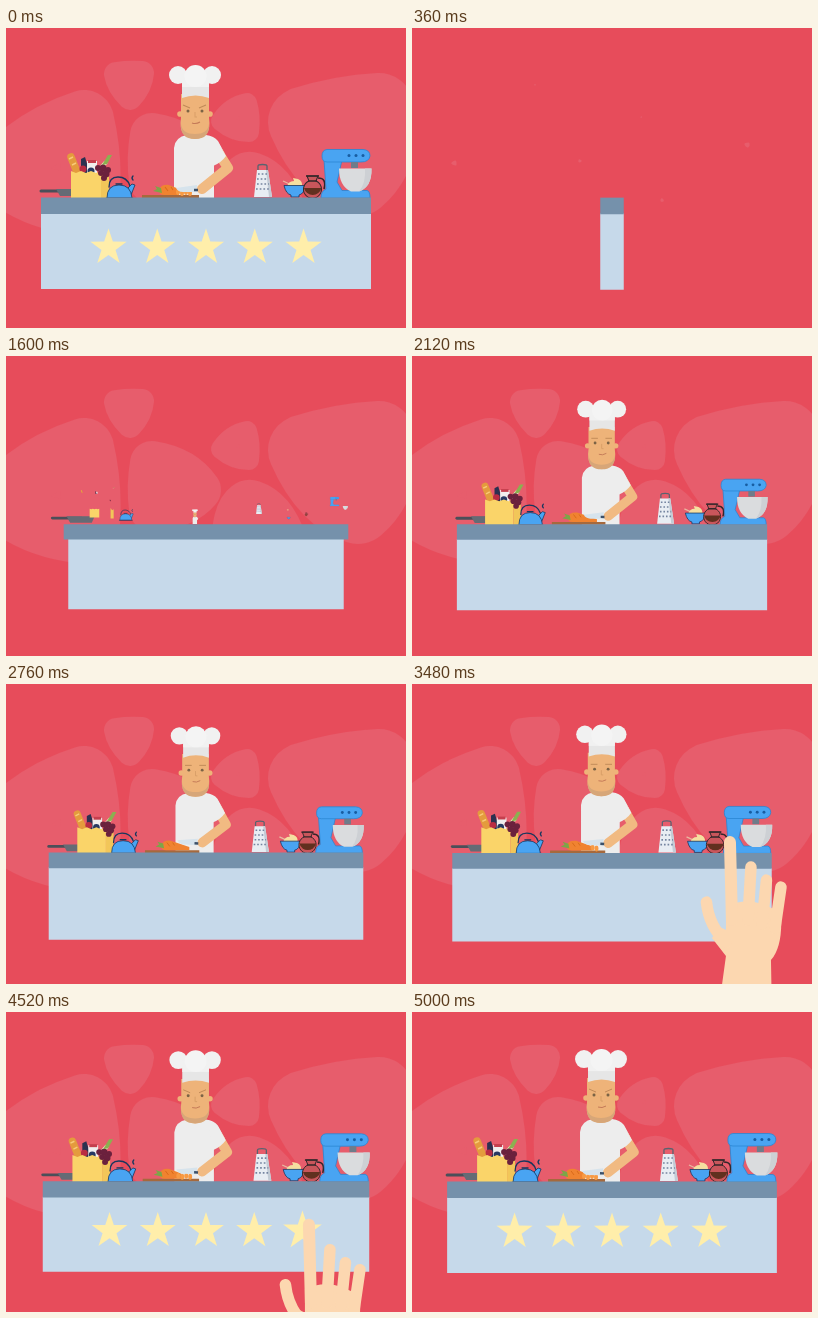
These frames come from a looping animation (400 by 300 pixels, 5040 ms). An HTML page:

```html
<!DOCTYPE html>
<html lang="en">
<head>
<meta charset="utf-8">
<title>Five star kitchen</title>
<style>
html, body { margin: 0; width: 100%; height: 100%; overflow: hidden; background: #e74c5b; }
svg { display: block; width: 100vw; height: 100vh; }
.blob { fill: #e75d6c; stroke: #e75d6c; stroke-linejoin: round; }
.skin { fill: none; stroke: #f1ba82; stroke-linecap: round; stroke-linejoin: round; }
.line { fill: none; stroke: #17375e; stroke-width: 1.3; stroke-linecap: round; }
.blue { fill: #49a4f2; stroke: #2a86d2; stroke-width: .8; }
.outlined { stroke: #17375e; }
#hand { fill: #fcd7b0; stroke: #fcd7b0; stroke-linecap: round; }
</style>
</head>
<body>
<svg viewBox="0 0 400 300">
  <g id="blobs"></g>
  <g id="scene">
    <!-- data-pop: pivot x, pivot y, start time -->
    <g data-pop="65 164 1410">
      <path d="M35 163H66" stroke="#4b4f59" stroke-width="3" stroke-linecap="round"/>
      <path d="M50 161H80L77 168H54z" fill="#656b75"/>
    </g>

    <g data-pop="188 169 1588">
      <path d="M168 171V120Q169 109 181 107H200Q208 108 212 113L219 126L208 137V171z" fill="#ededed"/>
      <path d="M175 66H203V90Q206 110 189 111Q172 110 175 90z" fill="#eeb379"/>
      <path d="M175 96Q174 111 189 111Q204 111 203 96Q202 106 189 106Q176 106 175 96z" fill="#d7a678"/>
      <g fill="#eeb379"><circle cx="174" cy="86" r="2.800"/><circle cx="204" cy="86" r="2.800"/></g>
      <g fill="#7b6345"><circle cx="182" cy="83" r="1.500"/><circle cx="196" cy="83" r="1.500"/></g>
      <path id="brows" stroke="#c08a58" stroke-width="1"/>
      <path d="M189 84V89H191" fill="none" stroke="#d99f68"/>
      <path d="M186 95Q190 96.500 194 94" fill="none" stroke="#c47a58"/>
      <path d="M176 70V54H203V70Q189.500 65 176 70z" fill="#e6e6e6"/>
      <g fill="#f1f1f1">
        <circle cx="172" cy="47" r="9"/><circle cx="206" cy="47" r="9"/>
        <path d="M176 47H203V59H176z"/>
      </g>
      <circle cx="189.500" cy="48" r="11" fill="#f4f4f4"/>
    </g>
    <g data-pop="165 168 1600">
      <path d="M136 167H193V170H136z" fill="#a5693d"/>
      <path id="carrot" fill="#f08330"/>
      <path d="M155 160L149 158L151 161L147 163L156 165z" fill="#7da548"/>
      <path d="M159 159L162 163M165 159L167 162" stroke="#d86a1b"/>
      <g id="slices" fill="#f79a43"></g>
    </g>
    <g data-pop="205 150 1610">
      <path id="arm" class="skin" stroke-width="10"/>
      <g id="knife">
        <path d="M170 160L191 157V164H177Q172 164 170 160z" fill="#d6e3ec"/>
        <path d="M188 162H192" stroke="#3c5068" stroke-width="2.500"/>
      </g>
      <path d="M203 114Q210 110 213 116L220 128Q215 135 207 138z" fill="#ededed"/>
    </g>

    <g data-pop="66 134 1585">
      <path d="M65 129L71 144" stroke="#e49b3d" stroke-width="7.500" stroke-linecap="round"/>
      <path d="M63 131L67 129M66 137L70 135" stroke="#f8ca77" stroke-width="1.500"/>
    </g>
    <g data-pop="82 135 1585">
      <path d="M75 131L79 129L82 139L84 148H75z" fill="#2c3150"/>
      <path d="M81 133H91V148H81z" fill="#f1eeee"/><path d="M82 132H90V135H82z" fill="#c53f4e"/>
      <circle cx="77" cy="141" r="3.500" fill="#b92c42"/>
      <circle cx="85" cy="143" r="3.500" fill="#273963"/>
    </g>
    <g data-pop="101 130 1590">
      <path d="M93 142L100 134" stroke="#e7edc0" stroke-width="4"/>
      <path d="M96 137L102 127L106 127L101 136z" fill="#8bb050"/>
    </g>
    <path data-pop="80 158 1560" d="M65 143L70 145L75 143L80 145L85 143L90 145L95 143V171H65z" fill="#fad469"/>
    <path data-pop="99 158 1550" d="M95 144L99 150L103 147V171H95z" fill="#f2c659"/>
    <g data-pop="97 144 1590" fill="#6b213d">
      <circle cx="92" cy="140" r="3"/><circle cx="97" cy="140" r="3.500"/><circle cx="102" cy="142" r="3"/>
      <circle cx="95" cy="145" r="3"/><circle cx="100" cy="146" r="3.500"/><circle cx="98" cy="150" r="3"/>
    </g>

    <g data-pop="114 160 1535">
      <path class="line" d="M103 159Q103 149 112 149Q121 149 124 158"/>
      <path class="blue outlined" d="M122 160L126 156L129 157L125 167z"/>
      <path class="blue outlined" d="M101 170Q101 157 113 157Q125 157 126 170z"/>
      <path class="line" d="M100 170.500H127M110 156H116M127 152Q125 150 127 148"/>
    </g>

    <g data-pop="257 153 1560">
      <path d="M252 142V138Q252 136.500 256.500 136.500Q261 136.500 261 138V142" fill="none" stroke="#59636f" stroke-width="1.300"/>
      <path d="M251 142H262L266 169H248z" fill="#e8edf3"/>
      <path d="M260 142H262L266 169H263z" fill="#c3ccd6"/>
      <path d="M252 146H261M251 151H262M251 156H263M250 161H263" stroke="#7484a0" stroke-width="1.700" stroke-dasharray="1.700 2"/>
    </g>

    <g data-pop="288 154 1588">
      <path d="M277 153L290 159" stroke="#e9b9a0" stroke-width="1.300"/>
      <path d="M281 159Q282 153 288 153L287 150L292 151Q297 153 296 159z" fill="#f5dfa0"/>
    </g>
    <path data-pop="289 163 1582" class="blue outlined" d="M278 157.500H299.500Q298 166 293 167V169H285V167Q280 166 278 157.500z"/>

    <g data-pop="308 159 1584">
      <path d="M312 150Q321 150 318 161" fill="none" stroke="#33272a" stroke-width="1.600"/>
      <path d="M301 148H312L310 153A9 9 0 1 1 303 153z" fill="#c9565b" stroke="#33272a"/>
      <path d="M298 160H315.500A9 9 0 0 1 298 160z" fill="#61301f"/>
      <path d="M300 148H313M302 153H311" stroke="#33272a" stroke-width="1.500"/>
    </g>

    <g data-pop="338 145 1578">
      <path class="blue" d="M318 132H336L331 154L336 162.500H361Q364 163 364 170H315Q315 163 320 161z"/>
      <path class="blue" d="M321 121.500H357Q364 122 364 128Q363 134 355 134H321Q316 134 316 128Q316 122 321 121.500z"/>
      <g fill="#185da1"><circle cx="343" cy="127.500" r="1.500"/><circle cx="350" cy="127.500" r="1.500"/><circle cx="357" cy="127.500" r="1.500"/></g>
      <path d="M345 134H352V140H345z" fill="#6e7c8a"/>
    </g>
    <g data-pop="350 152 1582">
      <path d="M333 140.500H365.500Q366 159 353 163.500H345Q333 158 333 140.500z" fill="#dadcde"/>
      <path d="M359 140.500H365.500Q366 159 353 163.500Q360 155 359 140.500z" fill="#cdd0d4"/>
    </g>

    <path id="base" d="M35 185H365V261H35z" fill="#c6d9ea"/>
    <path id="top" d="M35 169.500H365V186H35z" fill="#7591ab"/>
    <circle id="ripple" cx="297" cy="219" fill="#a5d6a0"/>
    <g id="stars" fill="#ffeeaa"></g>
  </g>
  <g id="hand">
    <path d="M314 222Q342 210 369 230Q371 262 359 276L360 330H306L314 272L300 254L308 243L314 246z" stroke="none"/>
    <path id="index" stroke-width="12"/>
    <path d="M336 236L339 183M350 240L354.500 196M363 244L369 203" stroke-width="11.500"/>
    <path d="M294.500 218Q297 242 314 258" stroke-width="11.500" fill="none"/>
  </g>
</svg>
<script>
const LOOP = 5040;
const $ = id => document.getElementById(id);
const clamp = x => Math.min(1, Math.max(0, x));
const span = (t, from, to) => clamp((t - from) / (to - from));
const inOut = p => p < .5 ? 4 * p ** 3 : 1 - 4 * (1 - p) ** 3;
const outCubic = p => 1 - (1 - p) ** 3;
const outBack = p => 1 + 2.7 * (p - 1) ** 3 + 1.7 * (p - 1) ** 2;
const place = (el, transform) => el.setAttribute('transform', transform);
const scaleAt = (el, x, y, sx, sy = sx) =>
  place(el, `translate(${x} ${y}) scale(${sx} ${sy}) translate(${-x} ${-y})`);

// pivot x, pivot y, corner radius, outline
const blobs = [
  [42, 135, 30, 'M78 92Q88 135 83 178Q28 174-5 144Q28 108 78 92z'],
  [123, 57, 12, 'M110 46Q123 44 136 45Q135 58 124 70Q112 58 110 46z'],
  [168, 133, 22, 'M146 107Q178 112 193 134Q178 152 145 153Q142 130 146 107z'],
  [229, 89, 10, 'M215 93Q225 78 241 75Q245 88 243 104Q228 104 215 93z'],
  [250, 172, 30, 'M244 154Q262 160 272 190Q250 195 235 190Q236 160 244 154z'],
  [335, 117, 35, 'M297 94Q335 82 373 80Q384 125 352 153Q318 142 297 94z']
];
$('blobs').innerHTML = blobs.map(([, , r, d]) => `<path class="blob" stroke-width="${2 * r}" d="${d}"/>`).join('');

const starPath = 'M' + Array.from({ length: 10 }, (_, i) => {
  const r = i % 2 ? 7.4 : 19, a = (i / 5 - .5) * Math.PI;
  return `${(r * Math.cos(a)).toFixed(2)} ${(r * Math.sin(a)).toFixed(2)}`;
}).join('L') + 'z';
$('stars').innerHTML = `<path d="${starPath}"/>`.repeat(5);
$('slices').innerHTML = '<ellipse rx="2" ry="3"/>'.repeat(4);

const pops = [...document.querySelectorAll('[data-pop]')]
  .map(el => [el, ...el.dataset.pop.split(' ').map(Number)]);

function drawScene(t) {
  const leaving = t < 800;
  const zoom = 1 + 2.05e-5 * (leaving ? t : t - LOOP);
  scaleAt($('scene'), 200, 150, zoom);

  const blobSize = leaving ? 1 - inOut(span(t, 20, 450)) : inOut(span(t, 920, 1560));
  blobs.forEach(([x, y], i) => scaleAt($('blobs').children[i], x, y, blobSize));

  for (const [el, x, y, start] of pops) {
    const exit = (start - 1410) * .3;
    scaleAt(el, x, y, leaving ? 1 - span(t, exit, exit + 260) ** 3 : outBack(span(t, start, start + 500)));
  }

  ['top', 'base'].forEach((id, i) => {
    const lag = i * 25;
    const width = leaving ? 1 - inOut(span(t, 80, 460)) : inOut(span(t, 1027 + lag, 1805 + lag));
    scaleAt($(id), 200, 215, width, 1);
  });

  [...$('stars').children].forEach((star, i) => {
    const size = leaving ? 1 - span(t, i * 20, 220 + i * 20) ** 3
      : outBack(span(t, 3950 + i * 80, 4310 + i * 80));
    place(star, `translate(${102.5 + 48.75 * i} 219.6) scale(${size})`);
  });

  const wave = span(t, 3900, 4240);
  $('ripple').setAttribute('r', wave * 40);
  $('ripple').setAttribute('opacity', 1 - wave);
}

function drawChopping(t) {
  const lift = Math.abs(Math.sin(t / 420 * Math.PI));
  place($('knife'), `translate(0 ${-2 * lift}) rotate(${4 * lift} 194 161)`);
  $('arm').setAttribute('d', `M212 124L${222 - lift} 140L196 ${161 - 2 * lift}`);

  const cut = t < 800 ? 1 : span(t, 2400, 5000);
  const end = 184 - 11 * cut;
  $('carrot').setAttribute('d', `M153 162Q155 156 163 157L${end} ${164 - cut * 3}V167H158Q153 167 153 162z`);
  [...$('slices').children].forEach((slice, i) => {
    slice.setAttribute('opacity', +(cut > (i + 1) / 5));
    place(slice, `translate(${184 - i * 4} ${165 - i % 2})`);
  });
  $('brows').setAttribute('d', cut > .5 ? 'M177 77L184 80M193 80L200 77' : 'M178 78H185M193 78H200');
}

function drawHand(t) {
  const away = 1 - outCubic(span(t, 2840, 3480));
  const reach = inOut(span(t, 3440, 3920));
  const leave = span(t, 4320, 4980) ** 2;
  const x = 60 * away - 16 * reach + 10 * leave;
  const y = 160 * away + 44 * reach + 115 * leave;
  place($('hand'), `translate(${x} ${y})`);
  $('hand').setAttribute('visibility', t > 2840 && t < 4990 ? 'visible' : 'hidden');

  const press = inOut(span(t, 3720, 3930)) - inOut(span(t, 4000, 4180));
  $('index').setAttribute('d', `M320 236L${318 - 6 * press} ${158 + 12 * press}`);
}

function frame(now) {
  const t = now % LOOP;
  drawScene(t);
  drawChopping(t);
  drawHand(t);
  requestAnimationFrame(frame);
}
frame(performance.now());
</script>
</body>
</html>
```
